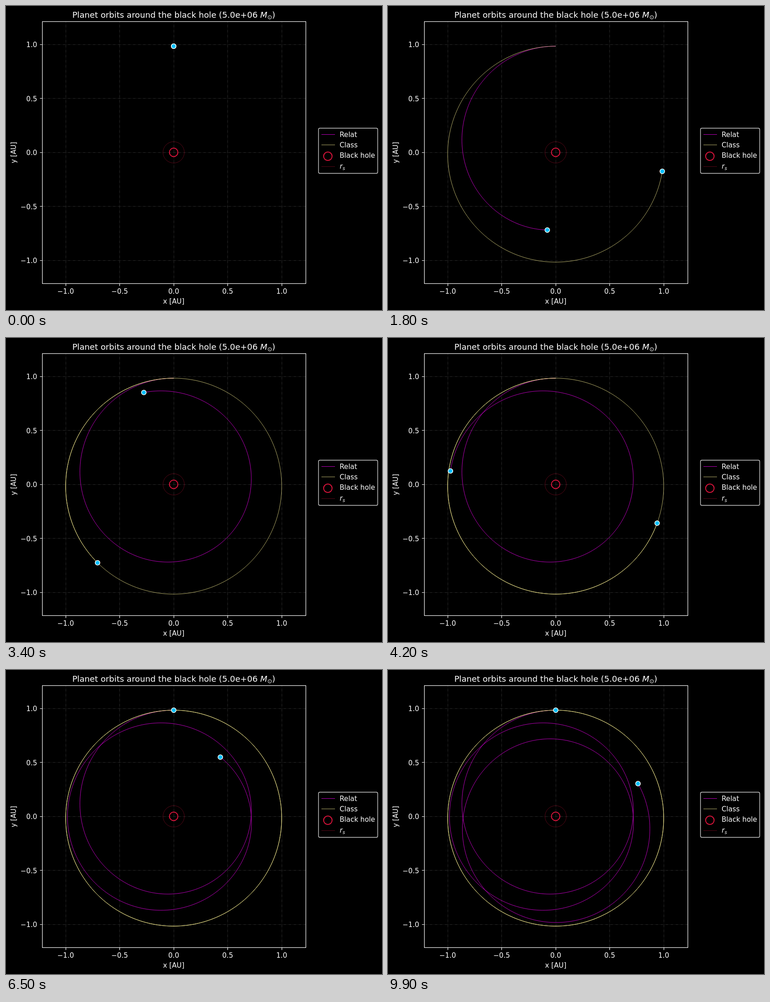
These frames come from a looping animation (832x673 px, 10 s). An HTML page:

```html
<!DOCTYPE html>
<html lang="en">
<head>
<meta charset="utf-8">
<title>Planet orbits around the black hole</title>
<style>
  html, body { margin: 0; width: 100%; height: 100%; overflow: hidden; background: #000; }
  svg { display: block; width: 832px; height: 673px; font: 15.2px "DejaVu Sans", sans-serif; fill: #fff; }
  .frame { fill: none; stroke: #fff; stroke-width: 1.2; }
  .grid { stroke: #292929; stroke-dasharray: 6.4 1.8 1.1 1.8; }
  .relat, .class { fill: none; stroke-width: .76; }
  .relat { stroke: #f0f; }
  .class { stroke: #f0e68c; }
  .again { stroke-width: 1; }
  .hole { fill: none; stroke: crimson; stroke-width: 2; }
  .horizon { fill: none; stroke: crimson; stroke-width: .76; stroke-opacity: .5; }
  .planet { fill: #00bfff; stroke: #fff; stroke-width: 1.5; }
  .legend { fill: #000; stroke: #ccc; stroke-width: 1.4; }
  .mid { text-anchor: middle; }
  .end { text-anchor: end; }
  .title { font-size: 18.2px; }
  .it { font-style: italic; }
</style>
</head>
<body>
<svg viewBox="0 0 832 673" xmlns="http://www.w3.org/2000/svg">
  <g id="axes"></g>
  <polyline id="relat" class="relat"/>
  <polyline id="lap1" class="class"/>
  <polyline id="lap2" class="class again"/>
  <circle class="horizon" cx="371" cy="324" r="23.6"/>
  <circle class="hole" cx="371" cy="324" r="9.4"/>
  <circle id="relatPlanet" class="planet" r="5.2"/>
  <circle id="classPlanet" class="planet" r="5.2"/>
  <rect class="frame" x="80.5" y="34.5" width="583" height="580"/>

  <text class="mid title" x="371.3" y="26">Planet orbits around the black hole (5.0e+06 <tspan class="it">M</tspan><tspan font-size="12.7" dy="3">⊙</tspan><tspan dy="-3">)</tspan></text>
  <text class="mid" x="371" y="659">x [AU]</text>
  <text class="mid" transform="translate(22 324.5) rotate(-90)">y [AU]</text>

  <rect class="legend" x="691.5" y="270.5" width="131" height="100" rx="3"/>
  <path class="relat" d="M698 284.5h30"/>
  <path class="class" d="M698 307.5h30"/>
  <circle class="hole" cx="712.2" cy="332.6" r="9.4"/>
  <path class="horizon" d="M698 355.5h30"/>
  <text x="738.2" y="289.5">Relat</text>
  <text x="738.2" y="313">Class</text>
  <text x="738.2" y="336">Black hole</text>
  <text class="it" x="738.6" y="360">r<tspan font-size="10.6" dy="2.5">s</tspan></text>
</svg>
<script>
const CX = 371, CY = 324, AU = 239;
const FRAMES = 100, FRAME_MS = 100, SUBSTEPS = 20;
const $ = id => document.getElementById(id);
const px = x => CX + x * AU;
const py = y => CY - y * AU;

function drawAxes() {
  let out = '';
  for (const v of [-1, -0.5, 0, 0.5, 1]) {
    const x = Math.floor(px(v)) + 0.5, y = Math.floor(py(v)) + 0.5;
    const label = v.toFixed(1).replace('-', '\u2212');
    out += `<path class="grid" d="M${x} 614V35"/><path class="grid" d="M81 ${y}H663"/>
      <path class="frame" d="M${x} 615v5M80 ${y}h-5"/>
      <text class="mid" x="${px(v)}" y="637">${label}</text>
      <text class="end" x="69" y="${py(v) + 6}">${label}</text>`;
  }
  $('axes').innerHTML = out;
}

// Velocity Verlet from perihelion, with GM = 1 and a = 1 AU.
// The coupling k adds the relativistic 1/r^4 term to the attraction.
function orbit(k, dt, steps) {
  const e = 0.0167;
  let x = 0, y = 1 - e, vx = -Math.sqrt((1 + e) / (1 - e)), vy = 0;
  const pull = () => {
    const r2 = x * x + y * y;
    return -(1 + k / r2) / (r2 * Math.sqrt(r2));
  };
  const kick = () => {
    const a = pull() * dt / 2;
    vx += a * x;
    vy += a * y;
  };
  const points = [[px(x), py(y)]];
  for (let i = 0; i < steps; i++) {
    kick();
    x += vx * dt;
    y += vy * dt;
    kick();
    points.push([px(x), py(y)]);
  }
  return points;
}

const STEPS = (FRAMES - 1) * SUBSTEPS;
const CLASS_STEPS = STEPS / 2, LAP = CLASS_STEPS / 2;
const GRAVITY_RADIUS = 0.04936;
const relat = orbit(3 * GRAVITY_RADIUS, 4 * Math.PI / STEPS, STEPS);
const classic = orbit(0, 4 * Math.PI / CLASS_STEPS, CLASS_STEPS);

function trace(id, points, from, to) {
  const part = to > from ? points.slice(from, to + 1) : [];
  $(id).setAttribute('points', part.map(p => p[0].toFixed(2) + ',' + p[1].toFixed(2)).join(' '));
}

function place(id, [x, y]) {
  $(id).setAttribute('cx', x);
  $(id).setAttribute('cy', y);
}

function draw(frame) {
  const r = frame * SUBSTEPS, c = Math.min(r, CLASS_STEPS);
  trace('relat', relat, 0, r);
  trace('lap1', classic, 0, Math.min(c, LAP));
  trace('lap2', classic, LAP, c);
  place('relatPlanet', relat[r]);
  place('classPlanet', classic[c]);
}

let shown = -1;
function tick() {
  const frame = Math.floor(performance.now() / FRAME_MS) % FRAMES;
  if (frame !== shown) draw(shown = frame);
  requestAnimationFrame(tick);
}

drawAxes();
tick();
</script>
</body>
</html>
```
